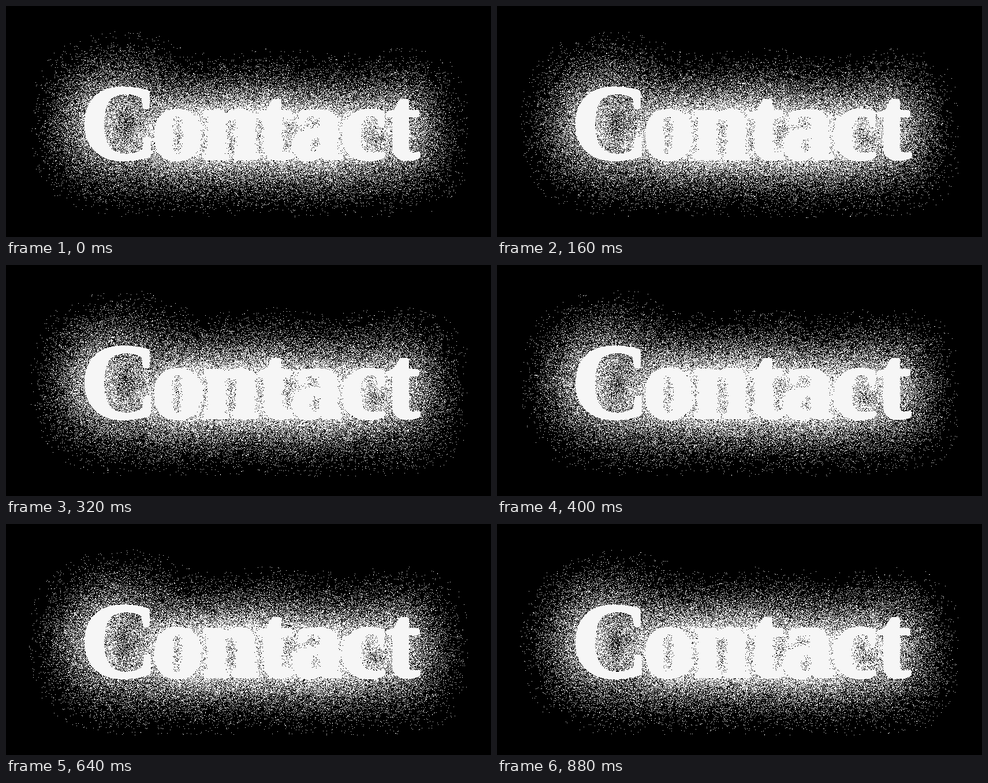
Recreate the animation shown at these times as an HTML page with a canvas. Size 840x400 px, loop 0.96 s.

```html
<!DOCTYPE html>
<html lang="en">
<head>
<meta charset="utf-8">
<title>Contact</title>
<style>
  html, body { margin: 0; width: 100%; height: 100%; overflow: hidden; background: #000; }
  canvas { display: block; }
</style>
</head>
<body>
<canvas id="stage" width="840" height="400"></canvas>
<script>
const W = 840, H = 400, STEPS = 12, STEP_MS = 80;
const REACH = 150, FALLOFF = 3.4, BLUR = 43;
const ctx = document.getElementById('stage').getContext('2d');

function makeContext() {
  const canvas = document.createElement('canvas');
  canvas.width = W;
  canvas.height = H;
  return canvas.getContext('2d', { willReadFrequently: true });
}

function alphaOf(context) {
  const { data } = context.getImageData(0, 0, W, H);
  return Float32Array.from({ length: W * H }, (_, i) => data[i * 4 + 3] / 255);
}

function drawWord(context) {
  const put = (text, x, size) => {
    context.font = `bold ${size}px "Liberation Serif", "Times New Roman", serif`;
    context.fillText(text, x, 265);
  };
  put('C', 129, 186);
  context.letterSpacing = '-3px';
  put('ontact', 252, 180);
}

// Vertical distance to the nearest letter pixel in the same column
function columnDistances(mask) {
  const dist = new Float32Array(W * H).fill(1e4);
  for (let i = 0; i < W * H; i++) {
    if (mask[i] > 0.5) dist[i] = 0;
    else if (i >= W) dist[i] = dist[i - W] + 1;
  }
  for (let i = W * (H - 1) - 1; i >= 0; i--) {
    dist[i] = Math.min(dist[i], dist[i + W] + 1);
  }
  return dist;
}

// Chance of each pixel being lit: falls with distance, ends where the blur fades out
function glowMap() {
  const word = makeContext(), soft = makeContext();
  drawWord(word);
  soft.filter = `blur(${BLUR}px)`;
  soft.drawImage(word.canvas, 0, 0);
  const column = columnDistances(alphaOf(word));
  const blur = alphaOf(soft);
  return blur.map((b, i) => {
    if (b === 0) return 0;
    const x = i % W, row = i - x;
    let best = column[i] ** 2;
    for (let dx = 1; dx * dx < best && dx < REACH; dx++) {
      if (x >= dx) best = Math.min(best, dx * dx + column[i - dx] ** 2);
      if (x + dx < W) best = Math.min(best, dx * dx + column[row + x + dx] ** 2);
    }
    const d = Math.max(0, Math.sqrt(best) - 2);
    if (d === 0) return 1;
    return Math.min(Math.max(0, 1 - d / REACH) ** FALLOFF, 3 * b);
  });
}

function randomFrom(seed) {
  return () => {
    seed = (seed + 0x6D2B79F5) | 0;
    let t = Math.imul(seed ^ (seed >>> 15), 1 | seed);
    t = (t + Math.imul(t ^ (t >>> 7), 61 | t)) ^ t;
    return ((t ^ (t >>> 14)) >>> 0) / 4294967296;
  };
}

function dissolve(glow, seed) {
  const image = ctx.createImageData(W, H);
  const pixels = new Uint32Array(image.data.buffer);
  const random = randomFrom(seed);
  glow.forEach((p, i) => { pixels[i] = random() < p ? 0xfff6f6f6 : 0xff000000; });
  return image;
}

const glow = glowMap();
const states = Array.from({ length: STEPS }, (_, i) => dissolve(glow, 7919 * (i + 1)));

const start = performance.now();
function draw() {
  const step = Math.floor((performance.now() - start) / STEP_MS) % STEPS;
  ctx.putImageData(states[step], 0, 0);
  requestAnimationFrame(draw);
}
draw();
</script>
</body>
</html>
```
